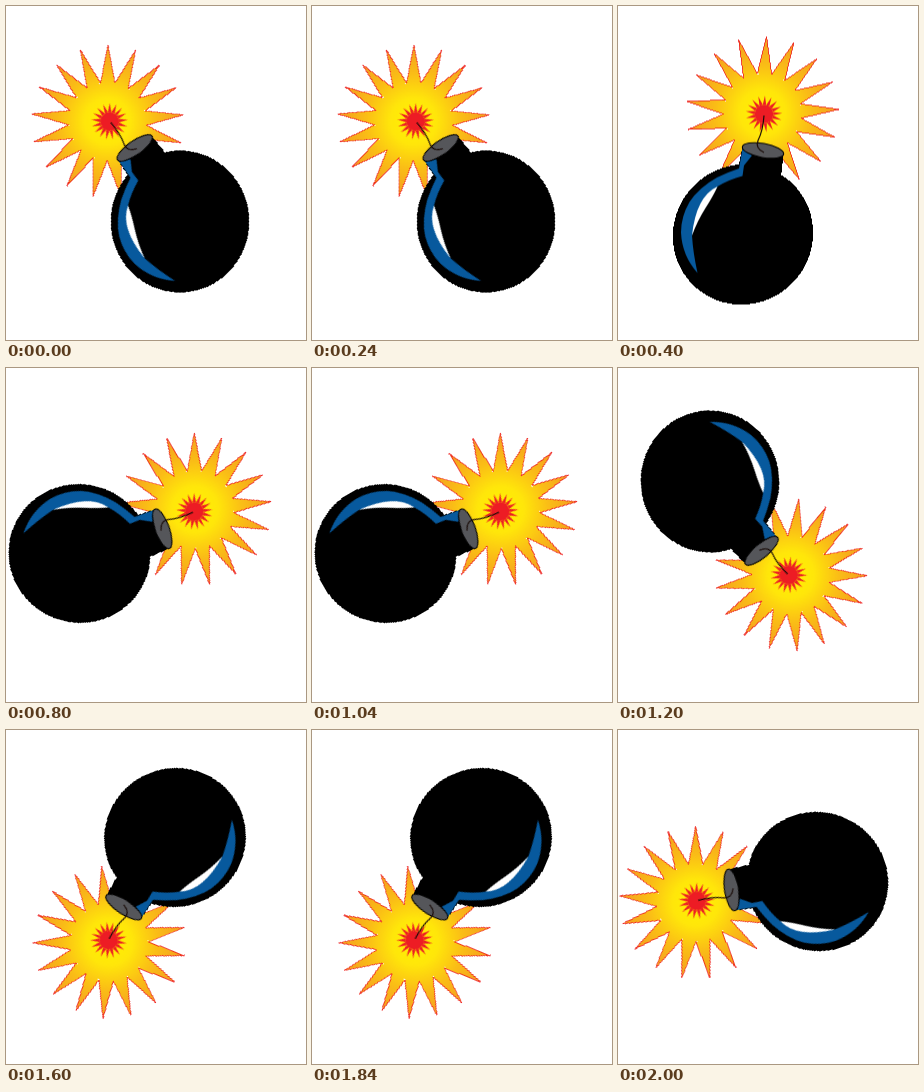
These frames come from a looping animation (300x334 px, 2400 ms). An HTML page without scripts:

```html
<!DOCTYPE html>
<html lang="en">
<head>
<meta charset="utf-8">
<title>Spinning bomb</title>
<style>
  html, body { margin: 0; width: 100%; height: 100%; overflow: hidden; background: #fff; }
  svg { display: block; width: 300px; height: 334px; }

  /* Six held poses; the ball centre is the pivot. */
  .bomb { animation: tumble 2.4s step-end infinite; }
  @keyframes tumble {
    0%      { transform: translate(174px, 215.5px) rotate(-45deg); }
    16.667% { transform: translate(125px, 228.5px) rotate(0deg); }
    33.333% { transform: translate(73.5px, 185.5px) rotate(60deg); }
    50%     { transform: translate(92px, 113.5px) rotate(130deg); }
    66.667% { transform: translate(169px, 107.5px) rotate(203deg); }
    83.333% { transform: translate(199.5px, 151.5px) rotate(251deg); }
    100%    { transform: translate(174px, 215.5px) rotate(-45deg); }
  }

  .flash { fill: url(#glow); stroke: #ee1c1c; stroke-width: .8; }
  .core { fill: #ed1c24; stroke: none; }
  .blue { fill: #07599d; }
  .flash, .ball { shape-rendering: crispEdges; }
</style>
</head>
<body>
<svg viewBox="0 0 300 334">
  <defs>
    <radialGradient id="glow" gradientUnits="userSpaceOnUse" cx="0" cy="0" r="77">
      <stop offset="0" stop-color="#fff200"/>
      <stop offset=".3" stop-color="#ffe60a"/>
      <stop offset=".62" stop-color="#fabd16"/>
      <stop offset="1" stop-color="#f39c20"/>
    </radialGradient>

    <!-- 17 rays, built by doubling; one turn step is 360/17 degrees -->
    <path id="ray" d="M-7.2-38.3L0-76.5 7.2-38.3"/>
    <g id="ray2"><use href="#ray"/><use href="#ray" transform="rotate(21.176)"/></g>
    <g id="ray4"><use href="#ray2"/><use href="#ray2" transform="rotate(42.353)"/></g>
    <g id="ray8"><use href="#ray4"/><use href="#ray4" transform="rotate(84.706)"/></g>
    <g id="star">
      <circle r="38.8" stroke="none"/>
      <use href="#ray8"/>
      <use href="#ray8" transform="rotate(169.412)"/>
      <use href="#ray" transform="rotate(338.824)"/>
    </g>
  </defs>

  <g class="bomb">
    <use class="flash" href="#star" transform="translate(19.5 -122) rotate(3)"/>
    <use class="core" href="#star" transform="translate(21 -120.5) rotate(3) scale(.24)"/>

    <g class="ball">
      <ellipse rx="71" ry="69.3" transform="rotate(-45)"/>
      <path d="M-.7-87.6L40.7-80.4 38-58 20-45-5-58-4-70Z"/>
    </g>

    <path class="blue" d="M-.5-86L-4-66Q-16-62-26-57Q-44-47-53.5-32.5Q-62-18-62-2Q-61 21-45.5 38.5Q-50 18-51 1Q-47-12-38-26.5L-25.5-48Q-14-55-.5-58.5L1-69 9-79Z"/>
    <path fill="#fff" d="M-25.5-48Q-47-38-51 1Q-46-13-37.5-26.5Q-30-38-25.5-48Z"/>

    <ellipse cx="20" cy="-84" rx="21" ry="7" transform="rotate(10 20 -84)" fill="#55565a" stroke="#000"/>
    <path d="M21-82Q12-86 15-94Q20-104 21-119" fill="none" stroke="#1a0c08" stroke-width="1.2"/>
  </g>
</svg>
</body>
</html>
```
